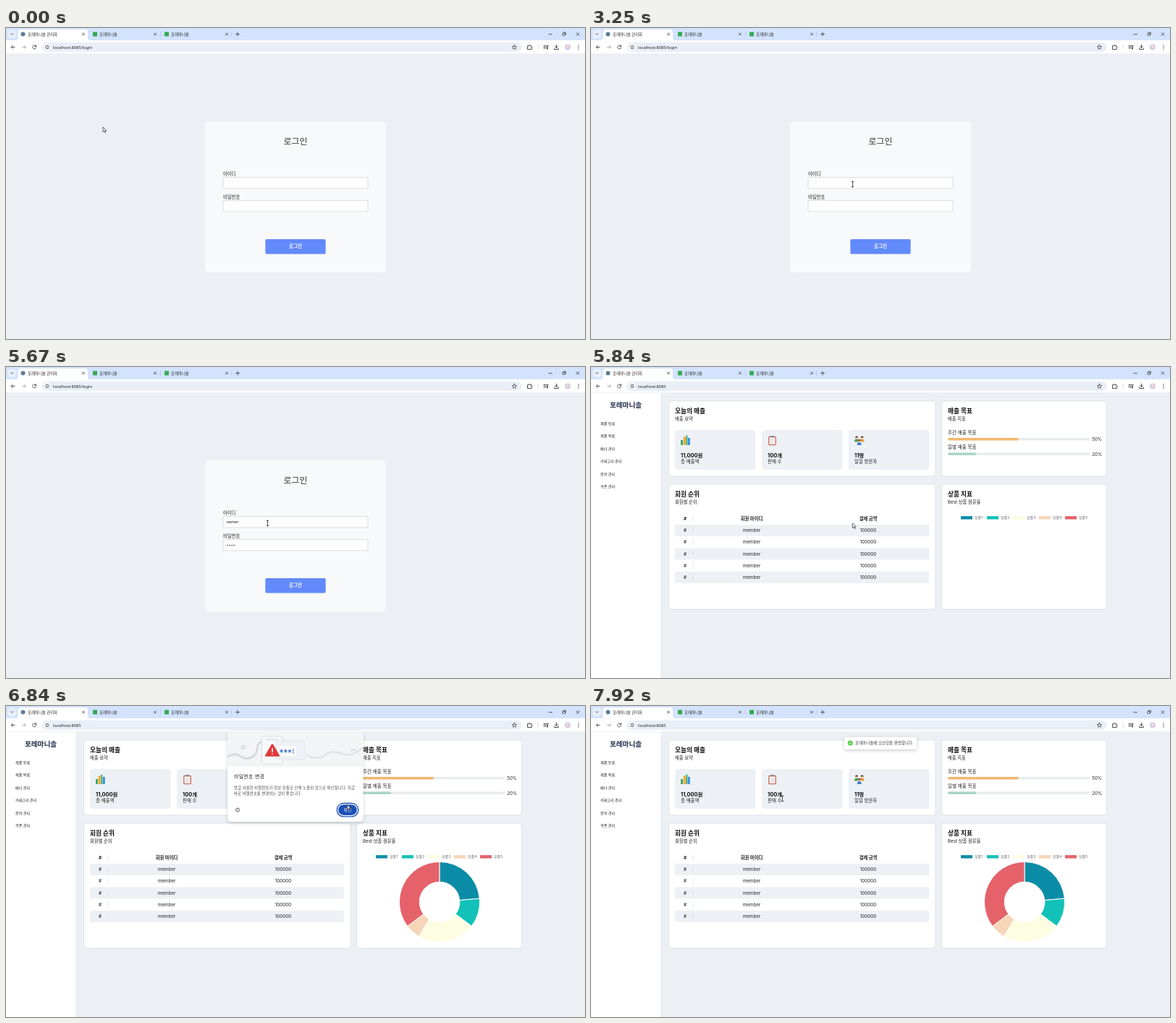
An HTML page that plays this animation: 800x430 px, repeating every 8000 ms.

```html
<!DOCTYPE html>
<html lang="ko">
<head>
<meta charset="utf-8">
<style>
html, body { margin: 0; width: 100%; height: 100%; overflow: hidden; background: #ecf0f5; }
svg { display: block; width: 800px; height: 430px; }
text { font-family: Inter, "Noto Sans CJK KR", "Noto Sans CJK", sans-serif; white-space: pre; }
.ui { font-family: "Noto Sans", "Noto Sans CJK KR", "Noto Sans CJK", sans-serif; }
</style>
</head>
<body>
<svg id="stage" viewBox="0 0 800 430"></svg>
<script>
const LOOP = 8000, STEP = 1000 / 12, ENTER = 5840;
const BRAND = '포레마니솔', USER = 'owner', MEMBER = 'member';
const INK = '#222', PALE = '#edf1f5';

// cy is the optical centre of the line
const text = (x, cy, size, str, o = {}) =>
  `<text x="${x}" y="${cy + size * .36}" font-size="${size}" fill="${o.fill || INK}"` +
  ` font-weight="${o.w || 400}" text-anchor="${o.a || 'start'}" letter-spacing="${o.ls || 0}"` +
  `${o.ui ? ' class="ui"' : ''}${o.id ? ` id="${o.id}"` : ''}>${str}</text>`;
const rect = (x, y, w, h, fill, r = 0, more = '') =>
  `<rect x="${x}" y="${y}" width="${w}" height="${h}" rx="${r}" fill="${fill}" ${more}/>`;
const disc = (x, y, r, fill, more = '') => `<circle cx="${x}" cy="${y}" r="${r}" fill="${fill}" ${more}/>`;
const line = (d, stroke = '#333', w = .8, more = '') =>
  `<path d="${d}" fill="none" stroke="${stroke}" stroke-width="${w}" stroke-linecap="round" stroke-linejoin="round" ${more}/>`;
const fill = (d, color) => `<path d="${d}" fill="${color}"/>`;
const cross = (x, y, r) => line(`M${x - r} ${y - r}l${2 * r} ${2 * r}M${x + r} ${y - r}l${-2 * r} ${2 * r}`);

function browser() {
  const ui = { ui: 1 };
  return rect(0, 0, 800, 18, '#d3e3fd') + rect(0, 17, 800, 19, '#fff') + rect(0, 35.5, 800, .6, '#e3e6ea') +
    rect(2.5, 2.5, 11.5, 12, '#e6effd', 4) + line('M6.6 7.6l1.7 1.7 1.7-1.7') +
    fill('M12 17.5q4.500 0 4.500-4.500V6q0-4 4-4H109q4 0 4 4v7q0 4.500 4.500 4.500z', '#fff') +
    disc(23.5, 8.5, 3, '#5d7c94') + text(30, 8.7, 5.4, BRAND + ' 관리자', ui) +
    [120, 219].map((x, i) => rect(x, 5.5, 6, 6, '#35a853') +
      text(x + 9, 8.7, 5.4, BRAND, ui) + rect(i ? 311 : 213.5, 5, .6, 7, '#a9bfe3')).join('') +
    [107, 206, 305].map(x => cross(x, 8.5, 1.5)).join('') +
    line('M317.500 8.500h5M320 6v5') +
    line('M750 8.700h4.500') + line('M769.300 7.300h3v3h-3zM770.400 7.200v-1.100h3v3h-1', '#333', .7) + cross(790, 8.5, 1.9) +
    line('M12 26.500H7.300M9.400 24.300l-2.200 2.200 2.200 2.200') +
    line('M22.500 26.500h4.700M25 24.300l2.200 2.200-2.200 2.200', '#9aa0a6') +
    line('M41.400 25.300a2.500 2.500 0 1 0 .1 2M41.600 23.800v1.800h-1.800') +
    rect(49.5, 20, 663, 13, '#e9eef7', 6.5) + disc(57, 26.5, 4.5, '#fff') +
    disc(57, 26.5, 2.4, 'none', 'stroke="#333" stroke-width=".7"') + line('M57 26.300v1.300M57 25.200v.1', '#333', .7) +
    text(65, 26.6, 5.68, '', { ui: 1, id: 'url' }) +
    line('M702.500 23.300l.9 2.100 2.200.2-1.700 1.500.5 2.200-1.900-1.200-1.900 1.200.5-2.200-1.700-1.500 2.200-.2z', '#333', .7) +
    line('M721 24.700h1.700v-.8q.8-1 1.500 0v.8h1.900v1.800h.6q.9.800 0 1.600h-.6v1.500H721z', '#333', .9) +
    rect(734.7, 23, .7, 7, '#c4d4ee') +
    line('M743 24.500h4.500M743 26.300h4.500M743 28.100h2.500M748.500 28.500v-4h1') + disc(747.7, 28.5, 1, '#333') +
    line('M760.500 23.300v3.800M758.700 25.500l1.800 1.800 1.800-1.800M757.700 28v1.500h5.600V28', '#333', .9) +
    disc(776, 26.5, 4, '#d9cbe0') + disc(776, 25.8, 1.7, '#f0dfe0') +
    [24, 26.5, 29].map(y => disc(791, y, .65, '#333')).join('');
}

function login() {
  const field = y => rect(300, y, 200, 15.3, '#fdfcfe', 0, 'stroke="#cfd2d8" stroke-width=".7"');
  return rect(275, 129, 250, 209, '#f8f9fb', 5) +
    text(400, 157, 11.9, '로그인', { a: 'middle', w: 500, fill: '#333' }) +
    text(300, 202, 6.3, '아이디') + field(206.7) +
    text(300, 234, 6.3, '비밀번호') + field(238.6) +
    text(304.7, 214.2, 5.7, '', { ui: 1, id: 'user' }) +
    [0, 1, 2, 3].map(i => disc(306 + i * 3.1, 246.5, .8, INK, 'class="dot"')).join('') +
    rect(0, 210.3, .7, 7.6, INK, 0, 'id="caret"') +
    rect(358.3, 292, 83.4, 20.6, '#638afb', 2) +
    text(400, 301.8, 6.5, '로그인', { a: 'middle', w: 700, fill: '#fff' });
}

function dashboard() {
  const card = (x, y, w, h, title, sub) =>
    rect(x, y, w, h, '#fff', 4, 'stroke="#d6dce3" stroke-width=".8"') +
    text(x + 8.5, y + 14, 8.7, title, { w: 700, fill: '#111' }) + text(x + 8.5, y + 25, 6.25, sub);
  const stat = (x, num, label) => rect(x, 87, 111.5, 55, PALE, 4) +
    text(x + 8, 122, 7.4, num, { w: 700, fill: '#111' }) + text(x + 8, 130.2, 6.4, label);
  const goal = (y, label, pct, color) => text(493, y, 6.5, label) +
    rect(493, y + 7.4, 196, 3.6, '#e9ecef', 1.8) + rect(493, y + 7.4, 1.96 * pct, 3.6, color, 1.8) +
    text(692.3, y + 9.3, 6.2, pct + '%');
  const row = (i) => {
    const y = 226 + i * 16.2;
    return (i % 2 ? '' : rect(116, y - 8, 351, 16, PALE)) + cells(y, '#', MEMBER, '100000');
  };
  const cells = (y, a, b, c, w) => rect(140.8, y - 4.5, .6, 9, '#d3d8de') +
    [[130, a], [222, b], [383, c]].map(([x, s]) => text(x, y, 6.3, s, { a: 'middle', w: w || (s == '#' ? 500 : 400) })).join('');
  const menu = ['제품 등록', '제품 목록', '배너 관리', '카테고리 관리', '문의 관리', '쿠폰 관리'];

  return rect(0, 36, 97, 394, '#fff') + rect(96.7, 36, .7, 394, '#dce1e7') +
    text(48, 52.5, 9.6, BRAND, { a: 'middle', w: 700, fill: '#1d2b48' }) +
    menu.map((s, i) => text(13, 78 + i * 17.5, 5.1, s, { w: 500 })).join('') +
    card(107.5, 47, 368.5, 104, '오늘의 매출', '매출 요약') +
    stat(116, '11,000원', '총 매출액') + stat(236, '100개', '판매 수') + stat(356, '11명', '일일 방문자') +
    rect(124, 101, 3, 7, '#3fa66b', .5) + rect(127.7, 96.5, 3, 11.5, '#f5a623', .5) +
    rect(131, 94.5, 2.5, 13.5, '#57b98a', .5) + rect(133.8, 98, 3, 10, '#3d8fe0', .5) +
    rect(245.8, 96.5, 9.4, 11.2, '#fbf8f7', 1, 'stroke="#c9665c" stroke-width="1.3"') + rect(248.3, 95, 4.4, 2.6, '#8a8f96', .8) +
    line('M248 100.500h5M248 102.700h5M248 104.900h3.500', '#b9b4b4', .6) +
    [[367, 97.5, '#4c9b58'], [374.5, 97.5, '#e59a3a'], [370.7, 102, '#3f7fd0']].map(([x, y, c]) =>
      fill(`M${x - 3} ${y + 6}q0-4 3-4t3 4z`, c) + disc(x, y, 2.1, '#f0c49a') +
      fill(`M${x - 2.1} ${y}a2.1 2.1 0 0 1 4.2 0z`, '#5a4136')).join('') +
    card(484.5, 47, 228, 104, '매출 목표', '매출 지표') +
    goal(90.5, '주간 매출 목표', 50, '#f3b96d') + goal(111, '일별 매출 목표', 20, '#aad6c6') +
    card(107.5, 162, 368.5, 173, '회원 순위', '회원별 순위') +
    cells(210, '#', '회원 아이디', '결제 금액', 700) + [0, 1, 2, 3, 4].map(row).join('') +
    card(484.5, 162, 228, 173, '상품 지표', 'Best 상품 점유율') +
    SLICES.map(([, c], i) => rect(511 + i * 36, 206.2, 16, 4.4, c) +
      text(530 + i * 36, 208.4, 5, '상품' + (i + 1), { fill: '#666' })).join('') +
    SLICES.map(([, c]) => `<path class="slice" fill="${c}" stroke="#fff" stroke-width="1"/>`).join('');
}

function toast() {
  return rect(350, 43, 100, 17, '#fff', 3, 'filter="url(#shade)"') +
    disc(358.3, 51.3, 3.5, '#5bd04a') + line('M356.800 51.400l1.100 1.100 2-2.200', '#fff', .8) +
    text(365, 51.3, 5.5, BRAND + '에 오신것을 환영합니다.', { fill: '#333' });
}

function dialog() {
  const spark = (x, y, r, c, w) => line([0, 60, 120].map(d => {
    const a = d * Math.PI / 180, u = r * Math.sin(a), v = r * Math.cos(a);
    return `M${x - u} ${y - v}L${x + u} ${y + v}`;
  }).join(''), c, w);
  return `<g id="sheet">` +
    rect(306.5, 34.5, 187, 125.5, '#fff', 5, 'filter="url(#shade)"') +
    fill('M306.500 84V39.500q0-5 5-5h177q5 0 5 5V84z', '#f3f4f6') +
    line('M307 70q8-6 16-1t14 3q10-4 10-13 0-9 9-10', '#d2d6dc', 2.5) +
    line('M416 68q14 8 24 0t24-2 29-9', '#e1e4e8', 2.5) +
    spark(328, 57, 4, '#d5d8dd', 1.2) + line('M477 62q3.500-3 6 0', '#cfd3d8', 1.5) +
    rect(353.5, 42, 29, 38, '#f8f9fb', 3, 'stroke="#d9dde3" stroke-width="1"') + rect(359, 45, 17, 2.5, '#e2e6eb', 1) +
    rect(373, 48, 40, 26, '#eef1f5', 3, 'stroke="#dde1e7" stroke-width=".7"') +
    rect(375, 55.5, 26, 13.5, '#fff', 2.5) +
    [380.5, 386.3, 392].map(x => spark(x, 62.3, 2.1, '#2f62c9', 1)).join('') + rect(396.5, 59, .9, 7, '#2f62c9') +
    fill('M368 52.500q1 0 1.600 1.200l8.200 14.300q.9 1.800-1.100 1.800h-17.400q-2 0-1.100-1.800l8.200-14.300q.6-1.200 1.600-1.200z', '#df3a3d') +
    line('M368 58.500v5M368 66.300v.1', '#fff', 1.5) +
    text(315, 97.5, 6.8, '비밀번호 변경', { ls: .4 }) +
    text(315, 113, 5.28, '방금 사용한 비밀번호가 정보 유출로 인해 노출된 것으로 확인됩니다. 지금', { ls: .2, fill: '#444', ui: 1 }) +
    text(315, 121, 5.28, '바로 비밀번호를 변경하는 것이 좋습니다.', { ls: .2, fill: '#444', ui: 1 }) +
    disc(320, 143.7, 2.6, 'none', 'stroke="#444" stroke-width=".8"') + line('M320 143.600v1.400M320 142.300v.1', '#444', .7) +
    `</g><g id="ok">` + rect(457.3, 134.5, 29.4, 18.4, '#fff', 9, 'stroke="#1b4fb3" stroke-width="1.300"') +
    rect(459.2, 136.4, 25.600, 14.6, '#1b50b6', 7.3) +
    text(472, 143.7, 5.8, '확인', { a: 'middle', fill: '#fff' }) + `</g>`;
}

// end angle in degrees, colour
const SLICES = [[85, '#0b8ca6'], [127, '#12c1b8'], [211, '#fcfde1'], [233, '#f6d5b8'], [360, '#e5626a']];

const stage = document.getElementById('stage');
stage.innerHTML =
  `<defs><filter id="shade" x="-20%" y="-40%" width="140%" height="200%">` +
  `<feDropShadow dx="0" dy="1.500" stdDeviation="2.500" flood-opacity=".2"/></filter></defs>` +
  rect(0, 0, 800, 430, '#ecf0f5') + `<g id="login">${login()}</g><g id="dash">${dashboard()}</g>` +
  browser() + `<g id="toast">${toast()}</g><g id="dialog">${dialog()}</g>` +
  `<g id="arrow"><path d="M0 0v6.700l1.600-1.400 1.100 2.400 1.100-.5-1.100-2.300h2.100z" fill="#fff" stroke="#222" stroke-width=".7"/></g>` +
  `<g id="beam">${line('M-1.300-3.700h2.600M-1.300 3.700h2.600M0-3.700v7.400', INK, .8)}</g>`;

const $ = id => document.getElementById(id);
const slices = [...document.querySelectorAll('.slice')], dots = [...document.querySelectorAll('.dot')];
const show = (el, on) => el.setAttribute('visibility', on ? 'visible' : 'hidden');
const move = (el, x, y, s = 1) => el.setAttribute('transform', `translate(${x} ${y}) scale(${s})`);

// time, then values
const POINTER = [[0, 134, 137], [80, 134, 137], [250, 105, 215], [420, 82, 304], [580, 84, 335], [750, 112, 376],
  [840, 155, 381], [1000, 241, 351], [1090, 241, 351], [1170, 285, 305], [1340, 352, 251], [1590, 352, 251],
  [1750, 359, 224], [1917, 361.5, 216], [5830, 361.5, 216], [5920, 357.5, 212], [6590, 357.5, 212],
  [6750, 440, 155], [6840, 474, 135], [6920, 475, 141], [7170, 475, 141], [7420, 400, 134], [7670, 300, 129],
  [7917, 264.5, 128]];
const SHEET = [[6080, 0], [6167, .14], [6250, .55], [6334, .88], [6417, 1], [7080, 1], [7250, 0]];
const TOAST = [[5900, 0], [6084, 1]];
const ID_KEYS = [3670, 3840, 4000, 4090, 4250], PW_KEYS = [4670, 4840, 4920, 5090], TAB = 4340;

function at(keys, t) {
  const i = keys.findIndex(k => k[0] > t);
  if (i < 0) return keys[keys.length - 1].slice(1);
  if (!i) return keys[0].slice(1);
  const a = keys[i - 1], b = keys[i], p = (t - a[0]) / (b[0] - a[0]);
  return a.slice(1).map((v, j) => v + (b[j + 1] - v) * p);
}
const typed = (keys, t) => keys.filter(k => k <= t + 5).length;

function ring(from, to) {
  const pt = (r, deg) => {
    const a = Math.min(deg, 359.99) * Math.PI / 180;
    return `${599 + r * Math.sin(a)} ${271 - r * Math.cos(a)}`;
  };
  const big = to - from > 180 ? 1 : 0;
  return `M${pt(55.5, from)}A55.5 55.5 0 ${big} 1 ${pt(55.5, to)}L${pt(27.8, to)}A27.8 27.8 0 ${big} 0 ${pt(27.8, from)}z`;
}

function draw(t) {
  const inside = t >= ENTER - 10;
  show($('login'), !inside);
  show($('dash'), inside);
  $('url').textContent = 'localhost:8085' + (inside ? '' : '/login');

  const n = typed(ID_KEYS, t), m = typed(PW_KEYS, t), inPw = t >= TAB - 10;
  $('user').textContent = USER.slice(0, n);
  dots.forEach((d, i) => show(d, !inside && i < m));
  const caret = $('caret');
  caret.setAttribute('x', inPw ? 304.7 + m * 3.1 : 304.7 + (n ? $('user').getComputedTextLength() : 0));
  caret.setAttribute('y', inPw ? 242.8 : 210.3);
  show(caret, !inside && ((t > 2740 && t < 3245) || (t > 3660 && t < 5660)));

  const p = Math.min(1, Math.max(0, (t - ENTER) / 1000)), grow = 1 - (1 - p) ** 4;
  slices.forEach((s, i) => s.setAttribute('d', ring((i ? SLICES[i - 1][0] : 0) * grow, SLICES[i][0] * grow)));

  const [drop] = at(TOAST, t);
  $('toast').setAttribute('opacity', drop);
  move($('toast'), 0, (drop - 1) * 8);

  const [o] = at(SHEET, t), s = 1 + .05 * (1 - o);
  $('sheet').setAttribute('opacity', o);
  $('ok').setAttribute('opacity', Math.min(1, o * 3));
  move($('dialog'), 400 * (1 - s), -11 * (1 - o), s);

  const [x, y] = at(POINTER, t), beam = (t > 1740 && t < ENTER - 10) || t > 7820;
  show($('arrow'), !beam);
  show($('beam'), beam);
  move($(beam ? 'beam' : 'arrow'), x, y);
}

const start = performance.now();
function tick() {
  const t = (performance.now() - start) % LOOP;
  draw(Math.floor((t + 4) / STEP) * STEP % LOOP);
  requestAnimationFrame(tick);
}
tick();
</script>
</body>
</html>
```
